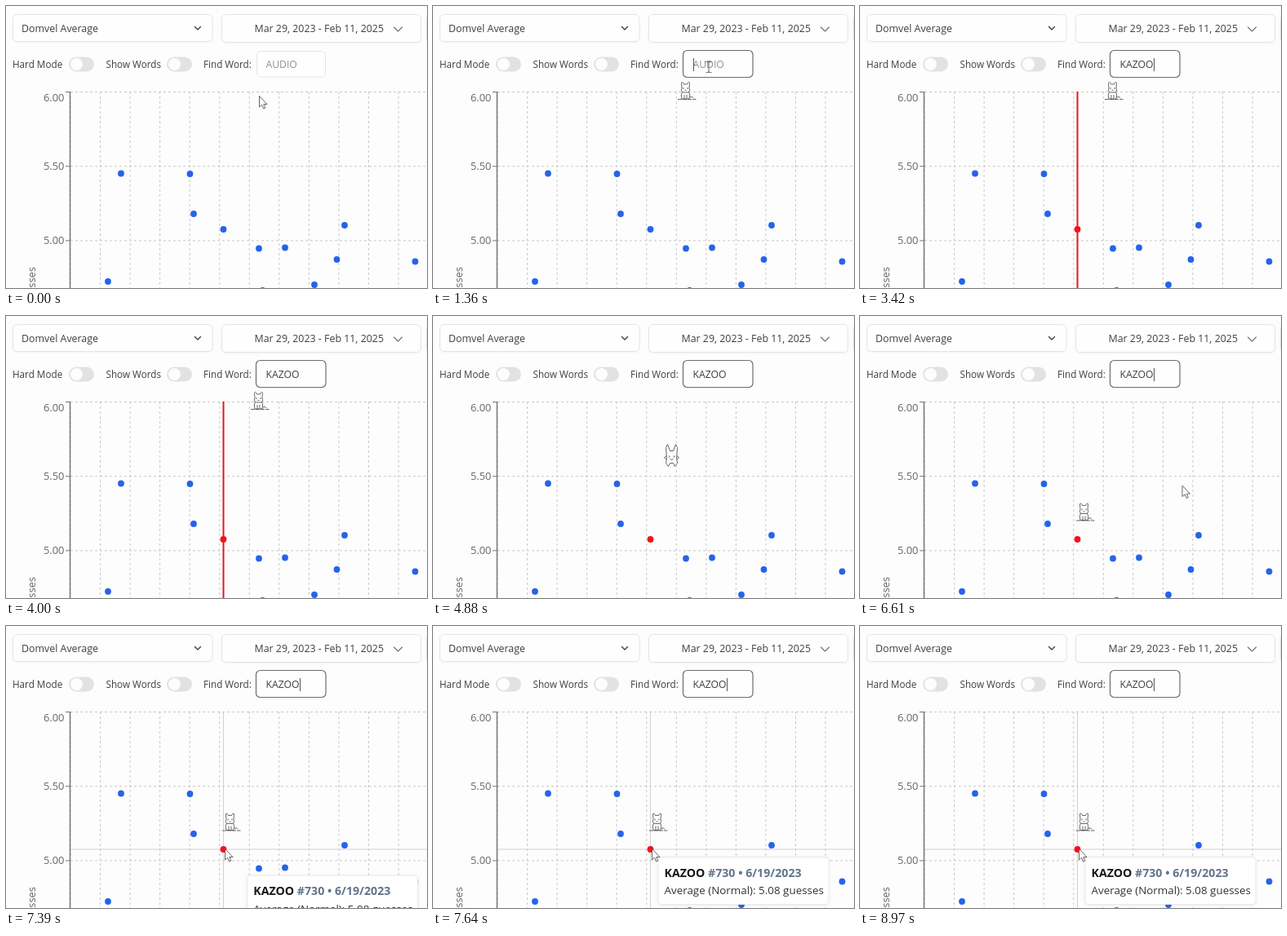
An HTML page that plays this animation: 516 by 346 pixels, repeating every 9 s.

```html
<!DOCTYPE html>
<html lang="en">
<head>
<meta charset="utf-8">
<title>Find a word</title>
<style>
html, body { margin: 0; width: 100%; height: 100%; overflow: hidden; background: #fdfdfd; }
svg { display: block; width: 516px; height: 346px; font-family: "Open Sans", "Noto Sans", sans-serif; }
.box { fill: #fefefe; stroke: #e4e4e6; }
.ui { fill: #3f3f46; }
.axis { fill: #666; font-size: 12.9px; }
.grid { stroke: #c8c8c8; stroke-dasharray: 3 3; }
.line { fill: none; stroke: #3f3f46; stroke-width: 1.4; stroke-linecap: round; stroke-linejoin: round; }
.thin { stroke: #71717a; stroke-width: 1.1; }
.cat { fill: #fff; stroke: #555; stroke-width: .9; stroke-linejoin: round; }
</style>
</head>
<body>
<svg viewBox="0 0 516 346">
  <defs>
    <filter id="soft" x="-10%" y="-30%" width="120%" height="170%">
      <feDropShadow dx="0" dy="1" stdDeviation="1" flood-opacity=".04"/>
    </filter>
    <filter id="lift" x="-10%" y="-20%" width="120%" height="150%">
      <feDropShadow dx="0" dy="1" stdDeviation="2" flood-opacity=".07"/>
    </filter>
  </defs>
  <rect width="516" height="346" fill="#fdfdfd"/>

  <g filter="url(#soft)">
    <rect class="box" x="8.5" y="10.5" width="244.5" height="33" rx="5"/>
    <rect class="box" x="264.5" y="10.5" width="244" height="34" rx="5"/>
    <rect class="box" x="515.5" y="10.5" width="80" height="34" rx="5"/>
  </g>
  <g class="ui" font-size="12.4">
    <text x="19" y="32">Domvel Average</text>
    <text x="304.5" y="32">Mar 29, 2023 - Feb 11, 2025</text>
  </g>
  <path class="line" d="M231.5 25.5l3.500 3.5 3.5-3.5"/>
  <path class="line thin" d="M475.5 26l5 5 5-5"/>
  <g class="ui" font-size="11.7">
    <text x="8" y="76">Hard Mode</text>
    <text x="122.5" y="76">Show Words</text>
    <text x="242" y="76">Find Word:</text>
  </g>
  <g id="toggles"></g>
  <rect id="input" class="box" rx="5"/>
  <text id="word" x="318.5" y="76" font-size="12.2"></text>

  <g id="grid"></g>
  <text class="axis" transform="translate(36 320) rotate(-90)" text-anchor="end">Guesses</text>
  <path id="cross" d="M79 274H516M266.5 105V346" stroke="#d0d0d0"/>
  <g id="dots"></g>
  <path id="mark" d="M266.5 105V346" stroke="#e8141c" stroke-width="2"/>
  <circle id="hit" cx="266.5" cy="274" r="3.9"/>

  <g id="sit" class="cat">
    <path d="M-5 0Q-8 5-6 10H3Q5 5 2 0Z"/>
    <path d="M-6-3L-6.500-9.500Q-5.500-12.500-3.500-8H.5Q2.500-12.500 3.500-9.500L3-3Q5 1 1 2H-4Q-8 1-6-3Z"/>
    <path d="M-4-4v2M1-4v2M-2.500-.500h2M-3 5v5M0 5v5" fill="none"/>
    <path d="M4 8q3-2 4 1M-11 10.500H11.500" fill="none" stroke-dasharray="5 1"/>
  </g>
  <g id="run" class="cat">
    <path id="legs" d="M-6 0L-9 2L-6 5M6 0L9 2L6 5"/>
    <path d="M-6 3L-7-10L-5-14L-2-6H2L5-14L7-10L6 3L7 9L4 13L2 9H-2L-4 13L-7 9Z"/>
    <path d="M-3 0v2M3 0v2M-2 4L0 5L2 4" fill="none"/>
  </g>

  <g id="tip">
    <rect x="0.5" y="0.5" width="209" height="58" rx="4" fill="#fff" stroke="#e8e8ea" filter="url(#lift)"/>
    <g font-size="14.2" font-weight="700">
      <text x="8" y="24.5" fill="#18181b">KAZOO</text>
      <text x="61.5" y="24.5" fill="#64748b">#730 • 6/19/2023</text>
    </g>
    <text x="8" y="46" font-size="13.4" fill="#333338">Average (Normal): 5.08 guesses</text>
  </g>
  <path id="caret" d="M0 64V80" stroke="#555"/>
  <path id="arrow" d="M.5.5V14L3.600 11.200L5.800 16L7.800 15L5.800 10.500H10Z" fill="#fff" stroke="#555" stroke-width=".9"/>
  <path id="beam" class="line thin" d="M-3-6.5H-1L0-5.5L1-6.5H3M0-5.5V5.5M-3 6.5H-1L0 5.5L1 6.5H3"/>
</svg>
<script>
const LOOP = 9000, FOCUS = 1280, FOUND = 2940, BLINK = 1110;
const HOVER = 7150, RUN = 4020, STEP = 117, STEPS = 14;
const keys = [2640, 2690, 2740, 2790, FOUND];
const path = [
  [0, 310, 110], [450, 310, 110], [760, 302, 101], [1000, 302, 101],
  [1300, 338, 75], [1730, 338, 75], [1910, 338, 88], [6120, 338, 88],
  [6610, 394, 207], [6760, 472, 298], [6970, 276, 280], [7120, 276, 280],
  [HOVER, 268, 273], [LOOP, 268, 273]
];
const points = [
  [141, 205.5], [225.5, 206], [230, 255], [310, 297.5], [342, 296.5], [378, 342],
  [405.5, 311], [415, 269], [501.5, 313.5], [125, 338], [314.5, 349]
];

const $ = id => document.getElementById(id);
const clamp = v => Math.max(0, Math.min(1, v));
const span = (t, a, b) => clamp((t - a) / (b - a));
const mix = (a, b, p) => a + (b - a) * p;
const show = (id, on) => $(id).setAttribute('visibility', on ? 'visible' : 'hidden');
const move = (id, x, y) => $(id).setAttribute('transform', `translate(${x} ${y})`);
const set = (id, attrs) => {
  for (const k in attrs) $(id).setAttribute(k, attrs[k]);
};

// CSS "ease" curve, solved by bisection
function ease(x) {
  const curve = (a, b, u) => 3 * a * u * (1 - u) ** 2 + 3 * b * u * u * (1 - u) + u ** 3;
  let lo = 0, hi = 1;
  for (let i = 0; i < 20; i++) {
    const mid = (lo + hi) / 2;
    if (curve(.25, .25, mid) < x) lo = mid; else hi = mid;
  }
  return curve(.1, 1, lo);
}

function build() {
  $('toggles').innerHTML = [77, 197].map(x =>
    `<rect x="${x}" y="62.5" width="31" height="18" rx="9" fill="#e2e2e5"/>
     <circle cx="${x + 9.5}" cy="71.5" r="7.5" fill="#fdfdfd"/>`).join('');
  let grid = '';
  for (let i = 0; i < 12; i++) {
    const x = 79 + i * 36.55;
    grid += `<path class="grid" d="M${x} 105V346"/>`;
  }
  ['6.00', '5.50', '5.00'].forEach((label, i) => {
    const y = 105.5 + i * 91.2;
    grid += `<path class="grid" d="M79 ${y}H516"/><path d="M73 ${y}H79" stroke="#777"/>
      <text class="axis" x="71.5" y="${i ? y + 4.5 : 116.5}" text-anchor="end">${label}</text>`;
  });
  $('grid').innerHTML = grid + '<path d="M78.5 105V346" stroke="#777" stroke-width="1.5"/>';
  $('dots').innerHTML = points.map(([x, y]) =>
    `<circle cx="${x}" cy="${y}" r="3.9" fill="#2563eb"/>`).join('');
}

function pointer(t) {
  const i = path.findIndex(k => k[0] > t);
  const a = path[i - 1], b = path[i], p = span(t, a[0], b[0]);
  return [mix(a[1], b[1], p), mix(a[2], b[2], p)];
}

function drawInput(t) {
  const focused = t >= FOCUS;
  const typed = keys.filter(k => t >= k).length;
  set('input', focused
    ? { x: 306.5, y: 54.5, width: 85.5, height: 33, style: 'stroke:#6c6c73;stroke-width:1.2' }
    : { x: 307.5, y: 55.5, width: 84, height: 31.5, style: '' });
  const word = $('word');
  word.textContent = typed ? 'KAZOO'.slice(0, typed) : 'AUDIO';
  word.setAttribute('fill', typed ? '#3f3f46' : '#909096');
  const x = typed ? 319 + word.getComputedTextLength() : 319.5;
  move('caret', Math.floor(x) + .5, 0);
  const since = typed ? t - keys[typed - 1] : t - FOCUS;
  show('caret', focused && since % BLINK < BLINK / 2);
}

function drawCat(t) {
  const step = Math.floor(span(t, RUN, RUN + STEP * STEPS) * STEPS);
  const running = step > 0 && step < STEPS;
  show('sit', t >= FOCUS && !running);
  show('run', running);
  if (step < STEPS) move('sit', 311, 104);
  else move('sit', 276, 240.5);
  move('run', mix(311, 274, step / STEPS), mix(101, 242, step / STEPS));
  move('legs', 0, step % 2 ? 0 : 3);
}

function drawPointer(t) {
  const [x, y] = pointer(t);
  const visible = t < keys[0] || t >= 6120;
  const text = x > 306 && x < 392 && y > 54 && y < 90;
  show('arrow', visible && !text);
  show('beam', visible && text);
  move('arrow', x, y);
  move('beam', x, y);
}

function draw(t) {
  drawInput(t);
  drawCat(t);
  drawPointer(t);
  $('hit').setAttribute('fill', t >= FOUND ? '#f5101c' : '#2563eb');
  $('mark').setAttribute('opacity', span(t, FOUND - 30, FOUND + 270) * (1 - span(t, 4000, 4500)));
  const left = 1 - ease(span(t, HOVER, HOVER + 400));
  show('cross', t >= HOVER);
  show('tip', t >= HOVER);
  move('tip', 275.5 + 175 * left, 283 + 200 * left);
}

build();
const start = performance.now();
function tick() {
  draw((performance.now() - start) % LOOP);
  requestAnimationFrame(tick);
}
tick();
</script>
</body>
</html>
```
